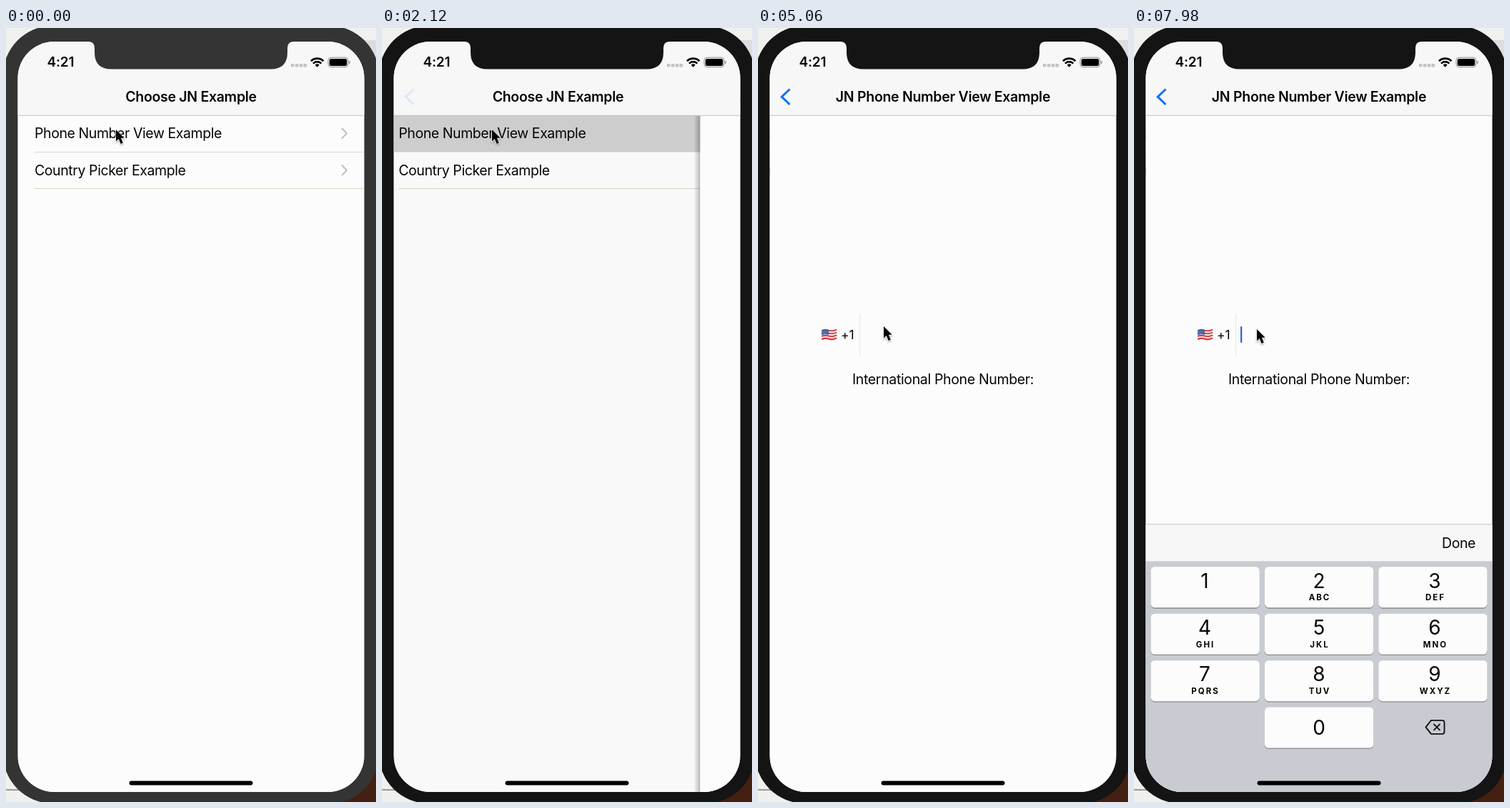
Write an HTML page that moves like this. It is 518 px wide and 1082 px high and loops after 8000 ms.

```html
<!DOCTYPE html>
<html lang="en">
<head>
<meta charset="utf-8">
<title>Phone number view</title>
<style>
html, body { margin: 0; width: 100%; height: 100%; overflow: hidden; background: #ececec; }
svg { display: block; width: 518px; height: 1082px; }
text { font-family: Inter, Roboto, "Liberation Sans", sans-serif; font-size: 19.5px; letter-spacing: -.42px; fill: #050505; white-space: pre; }
.title { font-weight: 600; letter-spacing: -.3px; text-anchor: middle; }
.digit { font-size: 28px; letter-spacing: 0; text-anchor: middle; }
.letters { font-size: 11.5px; font-weight: 700; letter-spacing: 2px; text-anchor: middle; }
.line { fill: none; stroke-linecap: round; stroke-linejoin: round; }
</style>
</head>
<body>
<svg viewBox="0 0 518 1082" xmlns="http://www.w3.org/2000/svg">
  <defs>
    <clipPath id="screen"><rect x="16.5" y="19" width="485" height="1049" rx="51"/></clipPath>
    <clipPath id="body"><rect x="16.5" y="122" width="485" height="946"/></clipPath>
    <linearGradient id="edge">
      <stop offset="0" stop-opacity="0"/>
      <stop offset="1" stop-opacity="1"/>
    </linearGradient>
    <filter id="soft" x="-50%" y="-50%" width="200%" height="200%">
      <feDropShadow dx="0" dy="1.5" stdDeviation="1.2" flood-opacity=".35"/>
    </filter>
  </defs>

  <rect width="518" height="1082" fill="#f0f0ee"/>
  <rect x="440" y="17" width="78" height="60" fill="#dcdce0"/>
  <path d="M0 1065H30" stroke="#444"/>
  <rect x="440" y="1000" width="78" height="82" fill="#43200f"/>
  <rect id="bezel" x="-4" y="-3" width="526" height="1087" rx="69"/>

  <g clip-path="url(#screen)">
    <rect x="16" y="18" width="486" height="1051" fill="#fcfcfc"/>
    <g clip-path="url(#body)">
      <g id="list">
        <rect x="16.5" y="122" width="485" height="946" fill="#fcfcfc"/>
        <path d="M40 224.5H502" stroke="#d5d7c6"/>
        <path id="rowLine" d="M40 173.5H502" stroke="#d5d7d2"/>
        <rect id="highlight" x="16.5" y="122" width="485" height="51.5" fill="#cfcfcf"/>
        <text x="40" y="154">Phone Number View Example</text>
        <text x="40" y="205.5">Country Picker Example</text>
        <path class="line" d="M470.5 140.5l6.5 6.8l-6.5 6.8M470.5 192l6.5 6.8l-6.5 6.8" stroke="#bfbfc3" stroke-width="2"/>
      </g>
      <rect id="dim" x="16.5" y="122" width="485" height="946"/>
      <g id="detail">
        <rect id="shadow" x="7.5" y="122" width="9" height="946" fill="url(#edge)"/>
        <rect x="16.5" y="122" width="485" height="946" fill="#fcfcfc"/>
        <g id="flag" class="line" stroke-width="2.2" style="stroke-linecap:butt"></g>
        <text x="116" y="435" style="font-size:17.5px;letter-spacing:-.2px">+1</text>
        <path d="M142.5 400V458" stroke="#e4e4ee"/>
        <text x="259" y="497.5" text-anchor="middle" style="letter-spacing:-.35px">International Phone Number:</text>
        <rect id="caret" x="149" y="417" width="2.3" height="23" rx="1" fill="#3d62cf"/>
      </g>
    </g>

    <rect x="16" y="18" width="486" height="104" fill="#f7f7f7"/>
    <path d="M16 122.3H502" stroke="#c3c3c8"/>
    <text id="listTitle" class="title" x="259" y="103">Choose JN Example</text>
    <text id="detailTitle" class="title" x="259" y="103">JN Phone Number View Example</text>
    <path id="back" class="line" d="M44.5 85.5L33.2 96.2L44.5 107" stroke="#0a72f2" stroke-width="3" style="stroke-linecap:butt;stroke-linejoin:miter"/>

    <text x="57.5" y="54.3" style="font-weight:600;font-size:19px;letter-spacing:-.2px">4:21</text>
    <g fill="#c3c3c8">
      <rect x="399" y="50" width="4.6" height="4.4" rx="1"/><rect x="405" y="50" width="4.6" height="4.4" rx="1"/>
      <rect x="410.800" y="50" width="4.6" height="4.4" rx="1"/><rect x="416.500" y="50" width="4.6" height="4.4" rx="1"/>
    </g>
    <g fill="none" stroke="#000" stroke-width="2.7">
      <path d="M427 46.300a12.200 12.200 0 0 1 17.400 0M430 49.600a8 8 0 0 1 11.400 0"/>
      <path d="M435.700 54.800l-3-3a4.300 4.300 0 0 1 6 0z" fill="#000" stroke="none"/>
    </g>
    <rect x="451" y="41.200" width="28" height="13.400" rx="4" fill="none" stroke="#8a8a8a"/>
    <rect x="452.700" y="42.900" width="24.600" height="10" rx="2.500"/>
    <path d="M480.300 45.800a2.300 2.300 0 0 1 0 4.400z" fill="#8a8a8a"/>

    <g id="keyboard">
      <rect x="16" y="693" width="486" height="53" fill="#f7f7f7"/>
      <path d="M16 693.500H502" stroke="#c6c6cc"/>
      <text x="431" y="727">Done</text>
      <rect x="16" y="745" width="486" height="330" fill="#c8cbd2"/>
      <g id="keys"></g>
      <path class="line" d="M416 967.500H431.500q3 0 3 3V983.500q0 3-3 3H416L408.500 977zM420 973l8 8m0-8l-8 8" stroke="#111" stroke-width="1.900"/>
    </g>
    <rect x="172.500" y="1052.500" width="173" height="6" rx="3"/>
  </g>

  <path id="notch" d="M115 17V19Q124 19 124 28V34Q124 57.500 147.500 57.500H370.500Q394 57.500 394 34V28Q394 19 403 19V17z"/>
  <path id="pointer" filter="url(#soft)" d="M0 0V16.500L3.700 13L6.600 20L9.800 18.700L6.900 11.800H11.700z" stroke="#fff" stroke-width="1.300" paint-order="stroke"/>
</svg>

<script>
const LOOP = 8000;
const el = id => document.getElementById(id);
const attr = (id, name, value) => el(id).setAttribute(name, value);
const move = (id, x, y = 0) => attr(id, "transform", `translate(${x} ${y})`);
const show = (id, on) => attr(id, "visibility", on ? "visible" : "hidden");

// Share of the way left for a critically damped spring.
function springLeft(ms, omega) {
  const u = Math.max(0, ms) / 1000 * omega;
  return (1 + u) * Math.exp(-u);
}

const pointerPath = [
  [4000, 154, 142], [4640, 160, 411], [5060, 176, 417], [5260, 191, 449], [5700, 172, 421]
];

function pointerAt(t) {
  const next = pointerPath.findIndex(p => p[0] > t);
  if (next === 0) return pointerPath[0].slice(1);
  if (next < 0) return pointerPath[pointerPath.length - 1].slice(1);
  const [a, b] = [pointerPath[next - 1], pointerPath[next]];
  const k = (t - a[0]) / (b[0] - a[0]);
  const ease = k * k * (3 - 2 * k);
  return [1, 2].map(i => a[i] + (b[i] - a[i]) * ease);
}

function buildFlag() {
  const wave = y => `M89.300 ${y}c4-2.200 7-1.400 10.400-.4s6.600 .7 10.400-1.400`;
  let art = "";
  for (let i = 0; i < 7; i++) {
    art += `<path d="${wave(423.5 + i * 1.95)}" stroke="${i % 2 ? "#f3e9e8" : "#d2383f"}"/>`;
  }
  art += `<path d="M89.300 422.400c4-2.200 6.500-1.500 9.500-.7v7.400c-3-.8-5.500-1.500-9.500 .7z" fill="#3d5a9c"/>`;
  art += `<path d="M90.500 424.200l7-.9M90.500 426.900l7-.9" stroke="#c3cde2" stroke-width=".9" stroke-dasharray="1 1.200"/>`;
  el("flag").innerHTML = art;
}

function buildKeys() {
  const letters = ["", "ABC", "DEF", "GHI", "JKL", "MNO", "PQRS", "TUV", "WXYZ"];
  const lefts = [23.5, 183, 342.3], centers = [99, 259, 421];
  const key = (digit, col, row, label, baseline) => {
    const y = 753 + row * 65.4;
    const box = (dy, fill) =>
      `<rect x="${lefts[col]}" y="${y + dy}" width="152.300" height="57" rx="5.500" fill="${fill}"/>`;
    return box(1.3, "#898b90") + box(0, "#fcfcfc") +
      `<text class="digit" x="${centers[col]}" y="${y + baseline}">${digit}</text>` +
      `<text class="letters" x="${centers[col] + 1}" y="${y + 47}">${label}</text>`;
  };
  el("keys").innerHTML =
    letters.map((label, i) => key(i + 1, i % 3, Math.floor(i / 3), label, 29.3)).join("") +
    key(0, 1, 3, "", 38);
}

function render(t) {
  const bezel = t < 1420 ? "#343434" : "#141414";
  attr("bezel", "fill", bezel);
  attr("notch", "fill", bezel);

  const pressed = t >= 1520;
  show("highlight", pressed);
  show("rowLine", !pressed);

  // The pushed view rests a hair short of its place before it snaps in.
  const left = springLeft(t - 2063, 10);
  const offset = t < 3240 ? Math.max(485 * left, 1.3) : 0;
  move("list", -145 * (1 - left));
  attr("dim", "opacity", 0.1 * (1 - left));
  move("detail", offset);
  show("detail", t >= 1900);
  attr("shadow", "opacity", 0.04 + 0.26 * left);

  move("listTitle", -109 * (1 - left));
  attr("listTitle", "opacity", Math.min(1, left * 1.4));
  move("detailTitle", 442 * left);
  attr("detailTitle", "opacity", 1 - left);
  attr("back", "opacity", 1 - left);

  attr("caret", "opacity", t >= 7400 ? 1 : 0);
  move("keyboard", 0, 376 * springLeft(t - 7470, 18.26));
  move("pointer", ...pointerAt(t));
}

function frame() {
  render(performance.now() % LOOP);
  requestAnimationFrame(frame);
}

buildFlag();
buildKeys();
frame();
</script>
</body>
</html>
```
